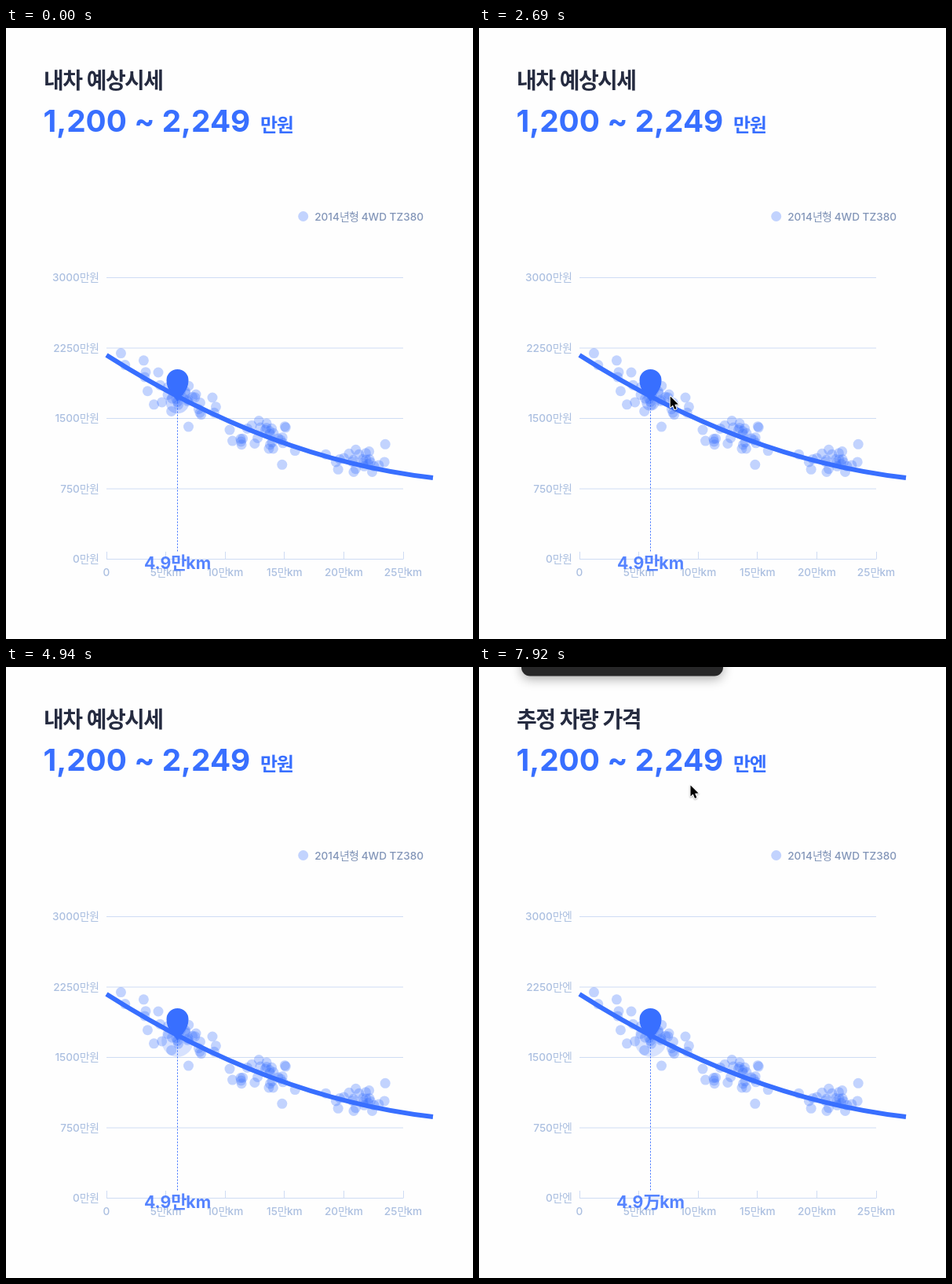
These frames come from a looping animation (595 px wide and 777 px high, 8000 ms). An HTML page with a canvas:

```html
<!DOCTYPE html>
<html lang="ko">
<head>
<meta charset="utf-8">
<title>Price chart</title>
<style>
html, body { margin: 0; width: 100%; height: 100%; overflow: hidden; background: #fefefe; }
canvas { display: block; }
</style>
</head>
<body>
<canvas id="stage" width="595" height="777"></canvas>
<script>
const ctx = document.getElementById('stage').getContext('2d');
const LOOP = 8000, STEP = 150;
const BLUE = '#386fff', INK = '#252b40', AXIS = '#abbfe0', GRID = '#cfdcf4', MUTED = '#8295b8';
const LEFT = 128, RIGHT = 506, TOP = 317.5, BOTTOM = 675.5, FLOOR = 564.5;
const PIN = { x: 218.5, y: 475.5 };
const CURVE = { x0: LEFT, y0: 416, x1: 544, y1: 572, bend: 548.3 };
const LATIN = 0.97; // Latin letters are set slightly smaller than CJK ones

const KO = { title: '내차 예상시세', unit: '만원', km: '만km', pin: '4.9만km', model: '2014년형 4WD TZ380',
  face: 'Noto Sans CJK KR', tight: -0.057, titleY: 77, priceY: 132, legendY: 244.5, xLabelY: 697 };
const JA = { title: '推定車両価格', unit: '万円', km: '万km', pin: '4.9万km', model: '2014年型 4WD TZ380',
  face: 'Noto Sans CJK JP', tight: 0, titleY: 82, priceY: 141, legendY: 246.5, xLabelY: 696 };
const KO_YEN = { ...KO, title: '추정 차량 가격', unit: '만엔', pin: '4.9万km' };

// Dots the cursor rests on, and for how long.
const STOPS = [
  { from: 890, to: 1040, x: 194, y: 438 },
  { from: 1640, to: 2240, x: 263, y: 470 },
  { from: 2840, to: 3740, x: 242, y: 466 },
  { from: 4190, to: 4340, x: 335, y: 535 }
];
const TOUR = [{ from: 140, to: 140, x: 54, y: 248 }, ...STOPS, { from: 4790, to: 4790, x: 412, y: 299 }];
const RETURN = [{ from: 7640, to: 7640, x: 273, y: 20 }, { from: 7940, to: LOOP, x: 273, y: 149 }];

const DOTS = scatter();
let lang = KO;

function curveY(x) {
  const t = (x - CURVE.x0) / (CURVE.x1 - CURVE.x0), s = 1 - t;
  return s * s * CURVE.y0 + 2 * s * t * CURVE.bend + t * t * CURVE.y1;
}

// Three loose clusters along the curve, cut off at the floor.
function scatter() {
  let seed = 11;
  const random = () => (seed = seed * 16807 % 2147483647) / 2147483647;
  const spread = d => (random() + random() - 1) * d;
  const cluster = (mid, width, count) => Array.from({ length: count }, () => {
    const x = mid + spread(width);
    return { x, y: Math.min(FLOOR, curveY(x) + spread(34)) };
  });
  return [PIN, ...STOPS, ...cluster(213, 68, 32), ...cluster(324, 54, 30), ...cluster(446, 52, 26)];
}

// Draws mixed text: Inter for Latin, a CJK face for the rest. Returns the left edge.
function text(str, x, y, size, weight, color, align = 0) {
  const runs = str.match(/[\u3000-\ud7a3]+|[^\u3000-\ud7a3]+/g).map(s => {
    const cjk = s.charCodeAt(0) >= 0x3000;
    const run = {
      s,
      font: `${weight} ${cjk ? size : size * LATIN}px ${cjk ? `"${lang.face}"` : 'Inter'}, sans-serif`,
      gap: `${cjk ? lang.tight * size : 0}px`
    };
    ctx.font = run.font;
    ctx.letterSpacing = run.gap;
    run.w = ctx.measureText(s).width;
    return run;
  });
  const left = x - align * runs.reduce((sum, r) => sum + r.w, 0);
  let pen = left;
  ctx.fillStyle = color;
  for (const r of runs) {
    ctx.font = r.font;
    ctx.letterSpacing = r.gap;
    ctx.fillText(r.s, pen, y);
    pen += r.w;
  }
  return left;
}

function line(x1, y1, x2, y2) {
  ctx.beginPath();
  ctx.moveTo(x1, y1);
  ctx.lineTo(x2, y2);
  ctx.stroke();
}

function disc(x, y, r, alpha) {
  ctx.globalAlpha = alpha;
  ctx.fillStyle = BLUE;
  ctx.beginPath();
  ctx.arc(x, y, r, 0, Math.PI * 2);
  ctx.fill();
  ctx.globalAlpha = 1;
}

function panel(x, y, w, h, r, color, shadow, blur, drop) {
  ctx.save();
  ctx.shadowColor = shadow;
  ctx.shadowBlur = blur;
  ctx.shadowOffsetY = drop;
  ctx.fillStyle = color;
  ctx.beginPath();
  ctx.roundRect(x, y, w, h, r);
  ctx.fill();
  ctx.restore();
}

function header() {
  text(lang.title, 48, lang.titleY, 28, 700, INK);
  text('1,200 ~ 2,249', 47.5, lang.priceY, 40, 700, BLUE);
  text(lang.unit, 324, lang.priceY - 0.5, 24, 700, BLUE);
  const left = text(lang.model, 532, lang.legendY, 14, 500, MUTED, 1);
  disc(left - 14.5, lang.legendY - 5, 6.5, 0.3);
}

function axes() {
  ctx.strokeStyle = GRID;
  ctx.lineWidth = 1;
  for (let i = 0; i < 5; i++) {
    const y = TOP + (BOTTOM - TOP) * i / 4;
    line(LEFT, y, RIGHT, y);
    text(3000 - 750 * i + lang.unit, 118, y + 4.5, 14, 500, AXIS, 1);
  }
  for (let i = 0; i < 6; i++) {
    const x = LEFT + (RIGHT - LEFT) * i / 5, tick = Math.floor(x) + 0.5;
    line(tick, 666, tick, BOTTOM);
    text(i ? i * 5 + lang.km : '0', x, i ? lang.xLabelY : 697, 14, 500, AXIS, 0.5);
  }
}

function pin() {
  const { x, y } = PIN, r = 14, head = y - 27.5;
  ctx.lineWidth = 1;
  ctx.setLineDash([2, 2]);
  line(x, y, x, 667);
  ctx.setLineDash([]);

  ctx.fillStyle = BLUE;
  ctx.beginPath();
  ctx.moveTo(x, y);
  ctx.bezierCurveTo(x - 4.5, y - 9, x - r, y - 14, x - r, head);
  ctx.arc(x, head, r, Math.PI, 0);
  ctx.bezierCurveTo(x + r, y - 14, x + 4.5, y - 9, x, y);
  ctx.fill();

  ctx.globalAlpha = 0.85;
  text(lang.pin, x, 688, 22, 700, BLUE, 0.5);
  ctx.globalAlpha = 1;
}

function plot(t) {
  const pulse = (t + 750) % 1500 / 1500;
  disc(PIN.x, PIN.y, 6 + 18 * pulse, 0.42 - 0.28 * pulse);
  for (const { x, y } of DOTS) disc(x, y, 6.5, 0.3);

  ctx.strokeStyle = BLUE;
  ctx.lineWidth = 6;
  ctx.beginPath();
  ctx.moveTo(CURVE.x0, CURVE.y0);
  ctx.quadraticCurveTo((CURVE.x0 + CURVE.x1) / 2, CURVE.bend, CURVE.x1, CURVE.y1);
  ctx.stroke();
  pin();
}

function tooltip({ x, y }) {
  const price = Math.round(1849 + (470 - y) * 6.5).toLocaleString('en-US');
  const km = (7.3 + (x - 263) * 0.0524).toFixed(1);
  panel(x, y - 16, 89, 61, 6, '#fff', 'rgba(60,90,160,.16)', 5, 1);
  text(price + lang.unit, x + 44.5, y + 9, 16, 700, BLUE, 0.5);
  text(km + lang.km, x + 44.5, y + 31.5, 13, 400, MUTED, 0.5);
}

// Rests at each stop and glides in a straight line between them.
function along(stops, t) {
  const i = stops.findIndex(s => t <= s.to);
  if (i < 0 || t < stops[0].from) return null;
  const b = stops[i], a = stops[i - 1] || b;
  const k = t >= b.from ? 1 : (t - a.to) / (b.from - a.to);
  return { x: a.x + (b.x - a.x) * k, y: a.y + (b.y - a.y) * k };
}

function cursor(t) {
  const at = along(TOUR, t) || along(RETURN, t);
  if (!at) return;
  ctx.save();
  ctx.translate(at.x - 4, at.y + 1);
  ctx.lineJoin = 'round';
  ctx.lineWidth = 2;
  ctx.strokeStyle = '#fff';
  ctx.fillStyle = '#000';
  ctx.shadowColor = 'rgba(0,0,0,.3)';
  ctx.shadowBlur = 2;
  ctx.shadowOffsetY = 1;
  const arrow = new Path2D('M.5 .5V14.5L3.7 11.6L6 17L8.4 16L6.1 10.8L10.6 10.6Z');
  ctx.stroke(arrow);
  ctx.shadowColor = 'transparent';
  ctx.fill(arrow);
  ctx.restore();
}

function dropdown(t) {
  if (t >= 7040) {
    panel(54, -60, 257, 71.5, 11, '#272728', 'rgba(0,0,0,.32)', 14, 4);
  } else if (t >= 5990) {
    const k = Math.min(1, (t - 5990) / 450);
    const edge = 17 * (1 - (1 - k) ** 2);
    panel(108, edge - 80, 186, 80, 12, '#212327', 'rgba(0,0,0,.45)', 14, 8);
  }
}

function draw(time) {
  // The picture advances in steps, pausing once before the language switch.
  let t = Math.max(0, Math.floor((time + 30) / STEP) * STEP - 10);
  if (t >= 6740 && t < 7040) t = 6740;

  lang = t < 7040 ? KO : t < 7490 ? JA : KO_YEN;
  ctx.fillStyle = '#fefefe';
  ctx.fillRect(0, 0, 595, 777);
  header();
  axes();
  plot(t);
  STOPS.filter(s => t >= s.from && t <= s.to).forEach(tooltip);
  dropdown(t);
  cursor(t);
}

const start = performance.now();
function tick() {
  draw((performance.now() - start) % LOOP);
  requestAnimationFrame(tick);
}
tick();
</script>
</body>
</html>
```
